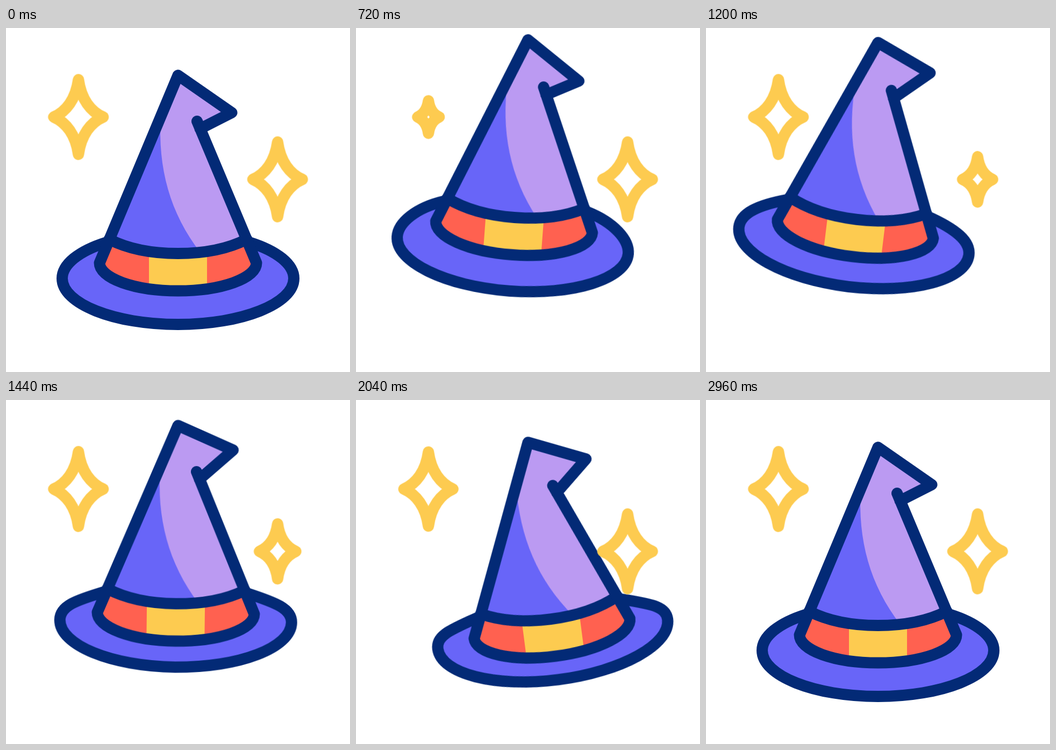
An HTML page for the animation above (3000 ms loop, 640 by 640 pixels).

```html
<!DOCTYPE html>
<html lang="en">
<head>
<meta charset="utf-8">
<title>Wizard hat</title>
<style>
  html, body { margin: 0; width: 100%; height: 100%; overflow: hidden; background: #fff; }
  svg { display: block; width: 100%; height: 100%; }

  .blue { fill: #6865f8; }
  .lilac { fill: #bb9af2; }
  .coral { fill: #ff6150; }
  .gold { fill: #fdcb50; }
  .line { stroke: #032a76; }
  .line, .star { stroke-width: 21; stroke-linecap: round; stroke-linejoin: round; }
  .open { fill: none; }
  .star {
    d: path("M0-69.5C5-33 23-10 46 0C23 10 5 33 0 69.5C-5 33-23 10-46 0C-23-10-5-33 0-69.5Z");
    fill: none;
    stroke: #fdcb50;
    vector-effect: non-scaling-stroke;
    transform-origin: 0 0;
  }

  .rise, .tilt, .brim, .cone, .star {
    animation: 3s cubic-bezier(.333, 0, .667, 1) infinite;
  }
  .rise { animation-name: rise; animation-timing-function: cubic-bezier(.2, 0, .27, 1); }
  .tilt { animation-name: tilt; transform-origin: 320px 88px; }
  .brim { animation-name: curl; }
  .cone { animation-name: flick; }
  .left { animation-name: twinkle-left; }
  .right { animation-name: twinkle-right; }

  @keyframes rise {
    0%, 7%, 92%, 100% { transform: translateY(0); }
    32% { transform: translateY(-71.5px); }
  }
  @keyframes tilt {
    0%, 11%, 87%, 100% { transform: rotate(0deg); }
    36% { transform: rotate(8deg); }
    61.5%, 64% { transform: rotate(-8deg); }
  }
  /* The brim sags on the way up, then curls upward. */
  @keyframes curl {
    0%, 8%, 99%, 100% {
      d: path("M187 398.7C135 415 104.5 440 104.5 466C104.5 513 201 551.5 320 551.5C439 551.5 535.5 513 535.5 466C535.5 440 505 415 453 398.7Z");
    }
    24% {
      d: path("M187 398.7C135 415 104.5 445 104.5 471C104.5 518 201 556.5 320 556.5C439 556.5 535.5 518 535.5 471C535.5 445 505 415 453 398.7Z");
    }
    57.3%, 68% {
      d: path("M187 398.7C135 415 104.5 421.5 104.5 447.5C104.5 494.5 201 533 320 533C439 533 535.5 494.5 535.5 447.5C535.5 421.5 505 415 453 398.7Z");
    }
  }
  /* The bent tip flicks up and drops back. */
  @keyframes flick {
    0%, 24%, 95.5%, 100% {
      d: path("M361 187.5L420 157.5L320 88L174 437A146 52 0 0 0 466 437L355.5 173.5");
    }
    40%, 68% {
      d: path("M361 187.5L423 132.5L320 88L174 437A146 52 0 0 0 466 437L355.5 173.5");
    }
  }
  @keyframes twinkle-left {
    0%, 7%, 40%, 67.5%, 82.5%, 100% { transform: scale(1); }
    24%, 75% { transform: scale(.435); }
  }
  @keyframes twinkle-right {
    0%, 24.7%, 58.5%, 82.7%, 98.3%, 100% { transform: scale(1); }
    41.3%, 90.7% { transform: scale(.6); }
  }
</style>
</head>
<body>
<svg viewBox="0 0 640 640">
  <g class="rise">
    <g class="tilt">
      <path class="brim line blue"/>
      <path class="cone lilac"/>
      <path class="coral" d="M192 393C225 410 270 419.5 320 419.5S415 410 448 393L466 437A146 52 0 0 1 174 437Z"/>
      <path class="gold" d="M266 415H374V484H266Z"/>
      <path class="blue" d="M297 144L288 165C282 260 305 345 362 418Q250 424 192 393Z"/>
      <path class="line open" d="M192 393C225 410 270 419.5 320 419.5S415 410 448 393"/>
      <path class="cone line open"/>
    </g>
  </g>
  <g transform="translate(134.7 165.6)"><path class="star left"/></g>
  <g transform="translate(505.3 281.6)"><path class="star right"/></g>
</svg>
</body>
</html>
```
